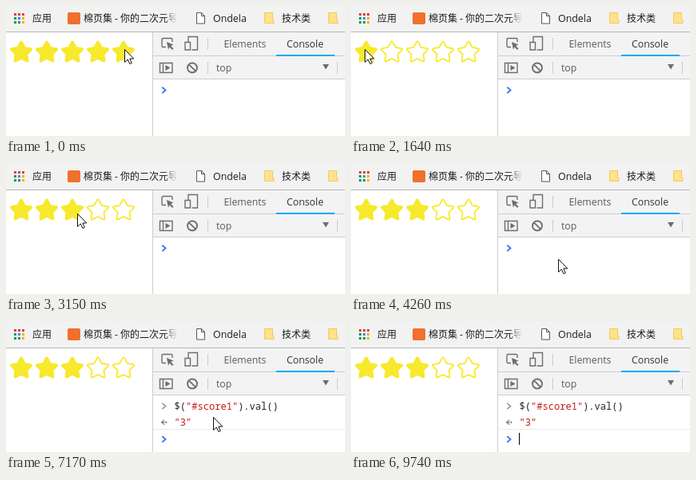
Animation of 424 by 163 pixels, one loop 9890 ms. Source, as an HTML page:

```html
<!DOCTYPE html>
<html lang="zh">
<head>
<meta charset="utf-8">
<title>Star rating</title>
<style>
html, body { margin: 0; width: 100%; height: 100%; overflow: hidden; background: #fff; }
svg { display: block; width: 424px; height: 163px; }
text { font: 12.3px "Open Sans", "Noto Sans CJK SC", "Noto Sans CJK", sans-serif; fill: #333; }
.bar text { font-size: 12px; fill: #1c1c1c; }
.bar .latin { font-size: 12.4px; }
.muted { fill: #5a5a5a; }
.code text { font: 12.05px "Noto Sans Mono", "DejaVu Sans Mono", monospace; fill: #222; }
.code .str { fill: #c41a16; }
.icon { fill: none; stroke: #6e6e6e; stroke-width: 1.4; }
.icon .solid { fill: #6e6e6e; stroke: none; }
.chev { fill: none; stroke: #367cf1; stroke-width: 1.8; }
.old { stroke: #8a8a8a; stroke-width: 1.4; }
.star { stroke: #f7e92b; stroke-width: 1.8; stroke-linejoin: round; }
</style>
</head>
<body>
<svg viewBox="0 0 424 163">
  <defs>
    <linearGradient id="fade">
      <stop offset="0" stop-color="#f2f2f2" stop-opacity="0"/>
      <stop offset="1" stop-color="#f2f2f2"/>
    </linearGradient>
    <path id="folder" d="M.5.5h10v9h1.5v4H.5z" fill="#ffe28a" stroke="#f0cb5c"/>
    <path id="chev" d="M0 0l4.300 3.700-4.300 3.700"/>
  </defs>

  <g class="bar">
    <rect width="424" height="32" fill="#f2f2f2"/>
    <rect y="32" width="424" height="1" fill="#b6b6b6"/>
    <g id="apps"></g>
    <text x="33" y="20">应用</text>
    <rect x="77" y="8" width="16" height="15" rx="2" fill="#f0702d"/>
    <text x="97" y="20">棉页集 - 你的二次元导</text>
    <rect x="198" y="6" width="16" height="20" fill="url(#fade)"/>
    <rect x="214" y="6" width="20" height="20" fill="#f2f2f2"/>
    <path d="M238.500 8.500h6l4 4v9.500h-10zM244.500 8.500v4h4" fill="#fff" stroke="#555"/>
    <text class="latin" x="259" y="20">Ondela</text>
    <use href="#folder" x="323" y="8"/>
    <text x="345" y="20">技术类</text>
    <use href="#folder" x="403" y="8"/>
  </g>

  <g id="stars"></g>

  <rect x="183" y="33" width="1" height="130" fill="#cdcdcd"/>
  <rect x="184" y="33" width="240" height="59" fill="#f3f3f3"/>
  <path d="M184 62.500h240M184 91.500h240M252.500 40v15M252.500 70v15M414.500 70v15" stroke="#ccc"/>
  <rect x="338" y="61" width="73" height="2" fill="#03a9f4"/>
  <text class="muted" x="272.500" y="52">Elements</text>
  <text x="351" y="52">Console</text>
  <text class="muted" x="263" y="82">top</text>
  <path d="M396 73h8l-4 6.500z" fill="#6e6e6e"/>
  <g class="icon">
    <path d="M200 51.500h-3.500q-1.500 0-1.500-1.500v-8q0-1.500 1.500-1.500h10q1.500 0 1.500 1.500v3"/>
    <path class="solid" d="M201 45l8.500 3.500-3.300 1.500 3.300 3.500-1.500 1.500-3.500-3.500-1.500 3.300z"/>
    <path d="M228 45v-6.500h11.500v16.500h-7M224 45.500h6.500v9.500h-6.500z"/>
    <path d="M192.500 71.500h15.500v12h-15.500zM196.500 71v13"/>
    <path class="solid" d="M199.500 74l6 3.500-6 3.500z"/>
    <path d="M228.800 73.300l8.400 8.400M239 77.500a6 6 0 1 0-12 0a6 6 0 1 0 12 0" stroke-width="1.900"/>
  </g>

  <g class="code">
    <use id="first" class="chev" href="#chev" x="195.300" y="101.800"/>
    <g id="match">
      <rect x="327" y="99" width="14" height="13" fill="#000" fill-opacity=".07"/>
      <path d="M327 112.500h14" stroke="#888"/>
    </g>
    <text id="cmd" x="210.600" y="110">$(<tspan class="str">"#score1"</tspan>).val()</text>
    <g id="result">
      <path class="chev old" d="M198 122.800l-3.500 3 3.500 3M195 125.800h3.500"/>
      <circle cx="200.300" cy="125.800" r="1.200" fill="#8a8a8a"/>
      <text class="str" x="210.600" y="130">"3"</text>
      <path d="M184 134.500h240" stroke="#ececec"/>
      <use class="chev" href="#chev" x="195.300" y="143.300"/>
    </g>
    <rect id="caret" width="1" height="15" fill="#000"/>
  </g>

  <path id="arrow" d="M.5.500v16l3.800-3.500 2.600 5.600 2.400-1.100-2.500-5.500h5z" fill="#fff" stroke="#111"/>
  <path id="beam" d="M0 .5h2.500l1 1 1-1h2.500M3.500 1.500v13M0 15.500h2.500l1-1 1 1h2.500" fill="none" stroke="#222"/>
</svg>
<script>
const LOOP = 9890, LEAVE = 3840, FOCUS = 4530, PASTE = 5720, ENTER = 6580, BEAM = 8020;
const BLINK = 518, SAMPLE = 135, PHASE = 15;

const $ = id => document.getElementById(id);
const add = (parent, tag, attrs) => {
  const el = document.createElementNS("http://www.w3.org/2000/svg", tag);
  for (const k in attrs) el.setAttribute(k, attrs[k]);
  return parent.appendChild(el);
};

const hues = { r: "#db4437", g: "#0f9d58", b: "#4285f4", y: "#f4b400" };
[..."rrrgbyggy"].forEach((c, i) => add($("apps"), "rect", {
  x: 10 + i % 3 * 5, y: 9 + Math.floor(i / 3) * 5, width: 3, height: 3, fill: hues[c]
}));

// Five-pointed star with softened tips
function starPath(cx, cy, outer, inner, cut) {
  const at = (r, i) => [cx + r * Math.sin(i * Math.PI / 5), cy - r * Math.cos(i * Math.PI / 5)];
  const mix = (a, b) => a.map((v, k) => v + (b[k] - v) * cut);
  let d = "";
  for (let i = 0; i < 10; i += 2) {
    const tip = at(outer, i), a = at(inner, i - 1), b = at(inner, i + 1);
    d += `${i ? "L" : "M"}${a}L${mix(tip, a)}Q${tip} ${mix(tip, b)}`;
  }
  return d + "Z";
}
const stars = Array.from({ length: 5 }, (_, i) =>
  add($("stars"), "path", { class: "star", d: starPath(19 + 32 * i, 58.2, 15.2, 7.8, .3) }));

// Turning points of the pointer: time, x, y
const path = [
  [0, 148, 54], [1790, 14, 54], [2740, 142, 55], [3270, 80, 63], [LEAVE, 80, 63],
  [4200, 259, 119], [7800, 259, 119], [8100, 331, 141], [8700, 331, 141], [9150, 338, 170]
];

function pointer(time) {
  const t = Math.max(0, Math.floor((time - PHASE) / SAMPLE) * SAMPLE + PHASE);
  const i = path.findLastIndex(p => p[0] <= t);
  const [t0, ...from] = path[i], [t1, ...to] = path[i + 1] || [LOOP, ...from];
  const ease = 1 - (1 - (t - t0) / (t1 - t0)) ** 1.5;
  return from.map((v, k) => Math.round(v + (to[k] - v) * ease));
}

const show = (id, on) => $(id).setAttribute("visibility", on ? "visible" : "hidden");
const place = (id, x, y) => $(id).setAttribute("transform", `translate(${x} ${y})`);

function draw(t) {
  const [x, y] = pointer(t);
  const score = t < LEAVE ? Math.floor((x - 4) / 32) + 1 : 3;
  stars.forEach((s, i) => s.setAttribute("fill", i < score ? "#f7e92b" : "#fff"));

  const pasted = t >= PASTE, entered = t >= ENTER;
  show("cmd", pasted);
  show("match", pasted && !entered);
  show("result", entered);
  $("first").classList.toggle("old", entered);

  show("caret", t >= FOCUS && Math.floor((t - FOCUS) / BLINK) % 2 === 0);
  place("caret", pasted && !entered ? 341 : 210, entered ? 139 : 98);

  show("arrow", t < BEAM);
  show("beam", t >= BEAM);
  place("arrow", x, y);
  place("beam", x, y);
}

const start = performance.now();
function tick() {
  draw((performance.now() - start) % LOOP);
  requestAnimationFrame(tick);
}
tick();
</script>
</body>
</html>
```
